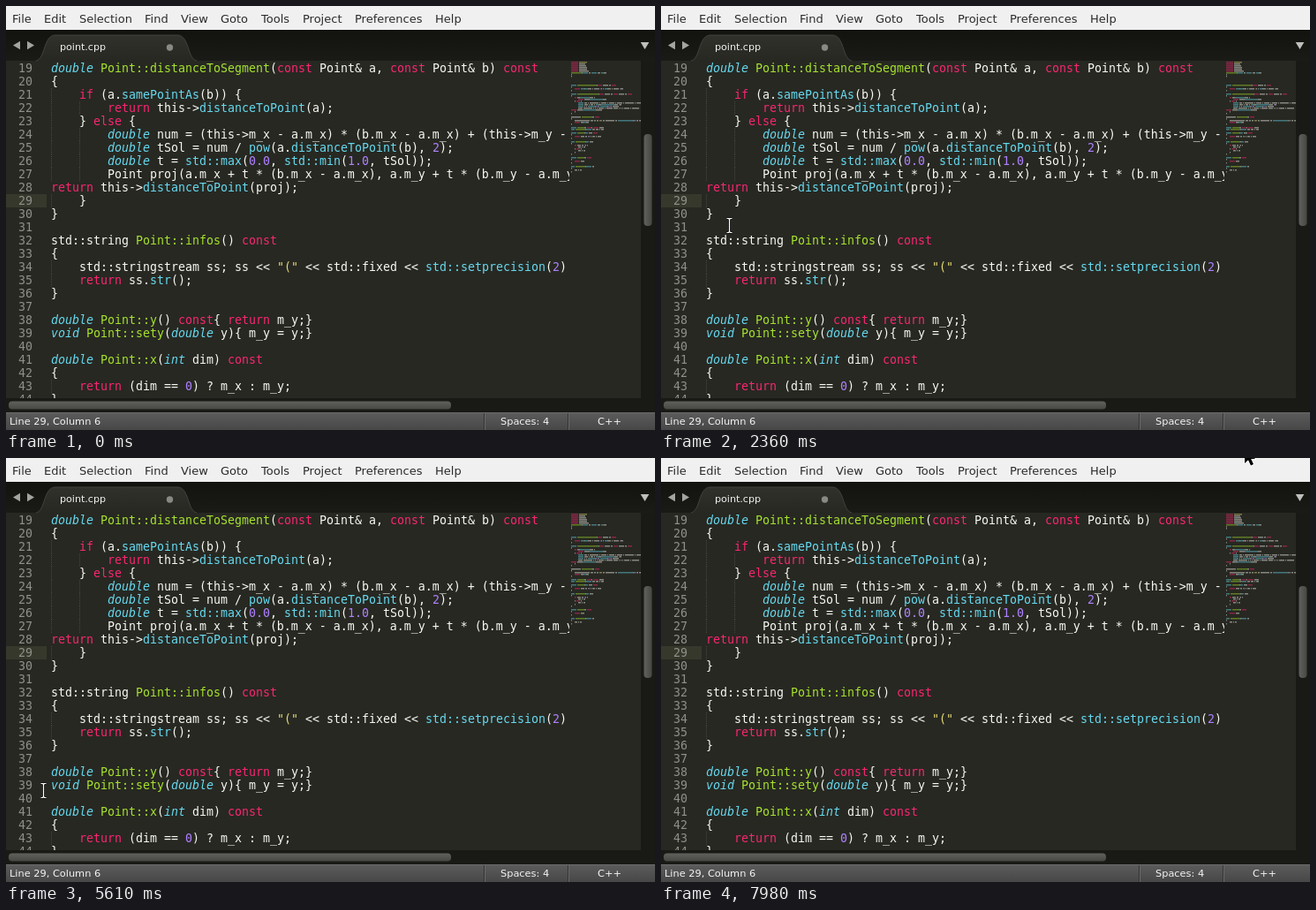
Write an HTML page with a canvas that moves like this. It is 735x480 px and loops after 8000 ms.

```html
<!DOCTYPE html>
<html lang="en">
<head>
<meta charset="utf-8">
<title>Code editor</title>
<style>
html, body { margin: 0; width: 100%; height: 100%; overflow: hidden; background: #272822; }
canvas { display: block; }
</style>
</head>
<body>
<canvas id="stage" width="735" height="480"></canvas>
<script>
const W = 735, H = 480, LOOP = 8000;
const MONO = '13.29px "DejaVu Sans Mono", monospace';
const SANS = '"DejaVu Sans", sans-serif';
const FIRST_LINE = 19, LAST_LINE = 44, CHAR = 8, ROW = 15, CODE_X = 51;

const code = `#include "point.h"
#include <cmath>
#include <string>
#include <sstream>
#include <iomanip>
#include <algorithm>
Point::Point(double x, double y): m_x(x)
{
}




double Point::distanceToPoint(const Point& p) const
{
    return sqrt(pow(m_x - p.m_x, 2) + pow(m_y - p.m_y, 2));
}

double Point::distanceToSegment(const Point& a, const Point& b) const
{
    if (a.samePointAs(b)) {
        return this->distanceToPoint(a);
    } else {
        double num = (this->m_x - a.m_x) * (b.m_x - a.m_x) + (this->m_y - a.m_y) * (b.m_y - a.m_y);
        double tSol = num / pow(a.distanceToPoint(b), 2);
        double t = std::max(0.0, std::min(1.0, tSol));
        Point proj(a.m_x + t * (b.m_x - a.m_x), a.m_y + t * (b.m_y - a.m_y));
return this->distanceToPoint(proj);
    }
}

std::string Point::infos() const
{
    std::stringstream ss; ss << "(" << std::fixed << std::setprecision(2) << m_x << ", " << m_y << ")";
    return ss.str();
}

double Point::y() const{ return m_y;}
void Point::sety(double y){ m_y = y;}

double Point::x(int dim) const
{
    return (dim == 0) ? m_x : m_y;
}

void Point::setx(int dim)
{
    if (dim == 0) {
        m_x = x;
    } else {
        m_y = x;
    }
}

double Point::x() const
{
    return m_x;
}

void Point::setx(double x)
{
    m_x = x;
}`.split('\n');

// Group order matches the colours below.
const SYNTAX = /("[^"]*")|(#include|\b(?:if|else|return|const)\b)|(\b(?:double|int|void)\b)|(Point::\w+)|((?:std::)?\b(?!proj\b)\w+(?=\())|(\b\d+(?:\.\d+)?\b)/g;
const COLOURS = ['#e6db74', '#f92672', '#66d9ef', '#a6e22e', '#66d9ef', '#ae81ff'];
const TYPE = 2, PLAIN = '#f8f8f2';

function tokenize(line) {
  const tokens = [];
  let end = 0;
  const plain = to => { if (to > end) tokens.push({ text: line.slice(end, to), col: end, colour: PLAIN }); };
  for (const match of line.matchAll(SYNTAX)) {
    plain(match.index);
    const kind = match.slice(1).findIndex(group => group !== undefined);
    tokens.push({ text: match[0], col: match.index, colour: COLOURS[kind], italic: kind === TYPE });
    end = match.index + match[0].length;
  }
  plain(line.length);
  return tokens;
}

function box(ctx, x, y, w, h, fill) {
  ctx.fillStyle = fill;
  ctx.fillRect(x, y, w, h);
}

function label(ctx, text, x, y, font, fill) {
  ctx.font = font;
  ctx.fillStyle = fill;
  ctx.fillText(text, x, y);
  return Math.ceil(ctx.measureText(text).width);
}

function triangle(ctx, x, y, dx, dy) {
  ctx.beginPath();
  ctx.moveTo(x + dx, y + dy);
  ctx.lineTo(x + dy * 0.6, y - dx * 0.6);
  ctx.lineTo(x - dy * 0.6, y + dx * 0.6);
  ctx.fill();
}

function gradient(ctx, x0, y0, x1, y1, from, to) {
  const g = ctx.createLinearGradient(x0, y0, x1, y1);
  g.addColorStop(0, from);
  g.addColorStop(1, to);
  return g;
}

function drawHeader(ctx) {
  box(ctx, 0, 0, W, 27, '#f0f0f0');
  let x = 7;
  for (const name of 'File Edit Selection Find View Goto Tools Project Preferences Help'.split(' '))
    x += label(ctx, name, x, 19, '13px ' + SANS, '#2b2b2b') + 14;

  box(ctx, 0, 27, W, 35, gradient(ctx, 0, 27, 0, 62, '#12130f', '#1a1b17'));
  const tab = new Path2D('M34 62C45 60 42 33 56 33H194C208 33 205 60 216 62');
  ctx.fillStyle = gradient(ctx, 0, 33, 0, 62, '#30312b', '#272822');
  ctx.fill(tab);
  ctx.strokeStyle = '#42433d';
  ctx.stroke(tab);
  label(ctx, 'point.cpp', 61, 50, '11.1px ' + SANS, '#f2f2f2');
  ctx.beginPath();
  ctx.arc(185.5, 47, 3.7, 0, 7);
  ctx.fillStyle = '#888984';
  ctx.fill();
  ctx.fillStyle = '#a4a5a1';
  triangle(ctx, 16, 44.5, -8, 0);
  triangle(ctx, 24, 44.5, 8, 0);
  ctx.fillStyle = '#bfc0bc';
  triangle(ctx, 723.5, 41, 0, 8);
}

function drawGuides(ctx, line, y) {
  const indent = line.search(/\S/);
  for (let col = 0; col < indent; col += 4)
    for (let dy = 0; dy < ROW; dy += 2) box(ctx, CODE_X + col * CHAR, y + dy, 1, 1, '#45463d');
}

function drawCode(ctx) {
  ctx.save();
  ctx.beginPath();
  ctx.rect(0, 62, 638, 382);
  ctx.clip();
  box(ctx, 0, 213, 46, ROW, '#37382c');
  for (let n = FIRST_LINE; n <= LAST_LINE; n++) {
    const line = code[n - 1], y = 63 + (n - FIRST_LINE) * ROW;
    label(ctx, n, 14, y + 12, MONO, '#8f908a');
    drawGuides(ctx, line, y);
    for (const { text, col, colour, italic } of tokenize(line))
      label(ctx, text, CODE_X + col * CHAR, y + 12, (italic ? 'italic ' : '') + MONO, colour);
  }
  ctx.restore();
}

function drawMinimap(ctx) {
  ctx.globalAlpha = 0.45;
  code.forEach((line, i) => {
    for (const { text, col, colour } of tokenize(line))
      [...text].forEach((char, k) => {
        if (char !== ' ' && col + k < 79) box(ctx, 640 + col + k, 63 + i * 2, 1, 1.5, colour);
      });
  });
  ctx.globalAlpha = 1;
}

function drawScrollbars(ctx) {
  box(ctx, 719, 62, 16, 398, '#191a16');
  box(ctx, 0, 444, W, 16, '#191a16');
  const thumb = (x, y, w, h, fill) => {
    ctx.beginPath();
    ctx.roundRect(x, y, w, h, 4);
    ctx.fillStyle = fill;
    ctx.fill();
  };
  thumb(722.5, 145, 9, 104, gradient(ctx, 722, 0, 732, 0, '#62635f', '#454641'));
  thumb(3, 447.5, 501, 9, gradient(ctx, 0, 447, 0, 457, '#62635f', '#454641'));
}

function drawStatus(ctx) {
  box(ctx, 0, 460, W, 20, gradient(ctx, 0, 460, 0, 480, '#5c5c5c', '#474747'));
  box(ctx, 0, 460, W, 1, '#6b6b6b');
  const font = '11.35px ' + SANS;
  label(ctx, 'Line 29, Column 6', 4, 474, font, '#f4f4f4');
  label(ctx, 'Spaces: 4', 560, 474, font, '#f4f4f4');
  label(ctx, 'C++', 670, 474, font, '#f4f4f4');
  for (const x of [541, 636]) {
    box(ctx, x, 461, 1, 19, '#333');
    box(ctx, x + 1, 461, 1, 19, '#6a6a6a');
  }
}

// Each stroke is a smooth curve through points evenly spaced in time.
const strokes = [
  { from: 980, to: 4490, points: [
    [60, 190], [40, 215], [124, 226], [109, 193], [52, 208], [76, 247], [89, 247],
    [180, 250], [286, 270], [228, 294], [240, 300], [295, 268], [223, 297], [242, 313]] },
  { from: 4780, to: 7990, points: [
    [242, 313], [288, 160], [40, 95], [30, 360], [230, 420], [330, 150], [33, 276],
    [45, 375], [190, 396], [322, 386], [560, 270], [690, 110], [660, -13]] }
];

function pointerAt(t) {
  const { from, to, points } = strokes.findLast(stroke => t >= stroke.from);
  const last = points.length - 1;
  const s = Math.min(1, (t - from) / (to - from)) * last;
  const i = Math.min(last - 1, Math.floor(s)), u = s - i;
  const [a, b, c, d] = [-1, 0, 1, 2].map(k => points[Math.min(last, Math.max(0, i + k))]);
  return [0, 1].map(k => b[k] + u / 2 * (c[k] - a[k]
    + u * (2 * a[k] - 5 * b[k] + 4 * c[k] - d[k] + u * (3 * (b[k] - c[k]) + d[k] - a[k]))));
}

const ARROW = new Path2D('M0 0V17L4 13.3L7 19.5L10 18L7.2 12H12Z');
const IBEAM = new Path2D('M-3 -8H-1L0 -7L1 -8H3M0 -7V7M-3 8H-1L0 7L1 8H3');

function drawPointer(ctx, [x, y]) {
  const overText = x > 40 && x < 638 && y > 62 && y < 444;
  ctx.save();
  ctx.lineJoin = 'round';
  ctx.translate(Math.round(x), Math.round(y));
  if (overText) {
    ctx.translate(-0.5, -0.5);
    ctx.lineWidth = 3;
    ctx.strokeStyle = '#111';
    ctx.stroke(IBEAM);
    ctx.lineWidth = 1.2;
    ctx.strokeStyle = '#fff';
    ctx.stroke(IBEAM);
  } else {
    ctx.lineWidth = 2;
    ctx.strokeStyle = '#fff';
    ctx.stroke(ARROW);
    ctx.fillStyle = '#000';
    ctx.fill(ARROW);
  }
  ctx.restore();
}

const ctx = document.getElementById('stage').getContext('2d');
const editor = document.createElement('canvas');
editor.width = W;
editor.height = H;
const base = editor.getContext('2d');
box(base, 0, 0, W, H, '#272822');
[drawHeader, drawCode, drawMinimap, drawScrollbars, drawStatus].forEach(draw => draw(base));

const start = performance.now();
function frame() {
  const t = (performance.now() - start) % LOOP;
  ctx.drawImage(editor, 0, 0);
  // The pointer stays hidden until its first stroke.
  if (t >= strokes[0].from) drawPointer(ctx, pointerAt(t));
  requestAnimationFrame(frame);
}
frame();
</script>
</body>
</html>
```
